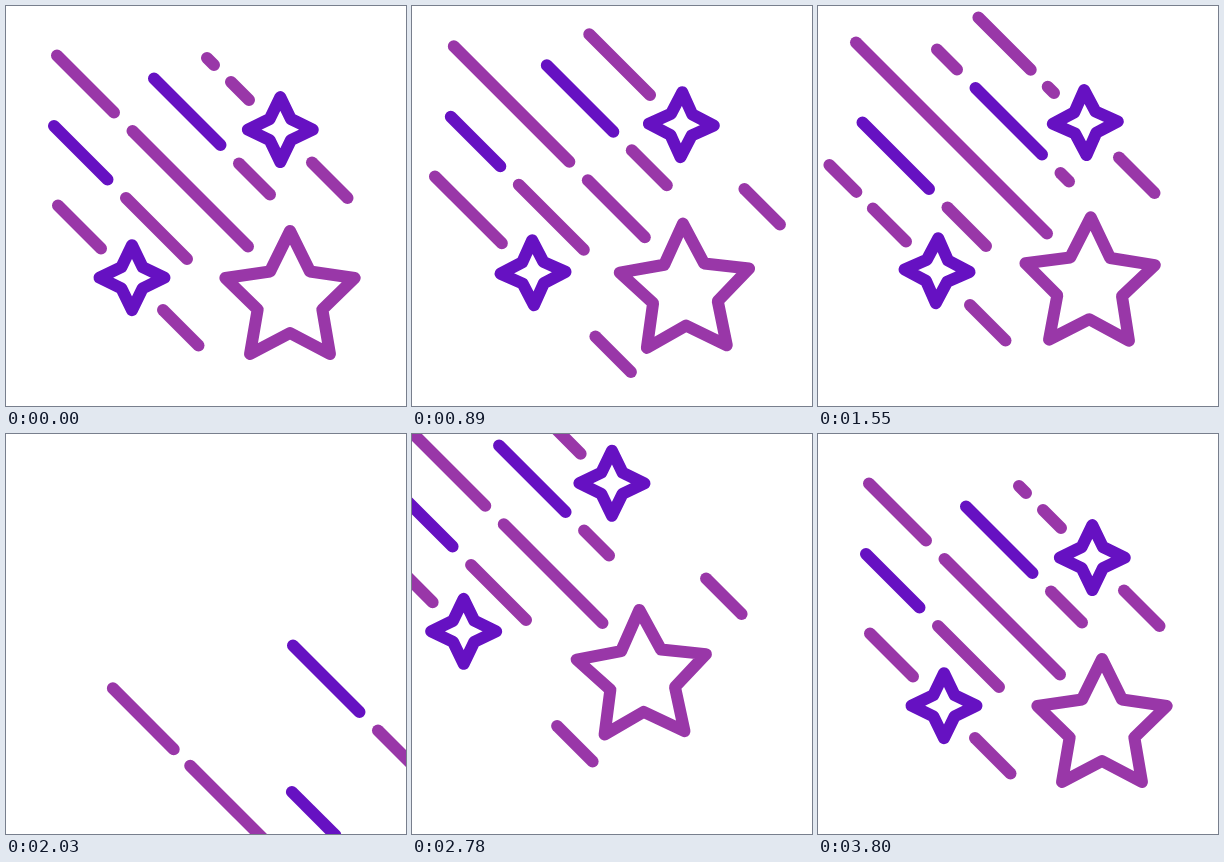
An HTML page with a canvas that plays this animation: 400 by 400 pixels, repeating every 3830 ms.

```html
<!DOCTYPE html>
<html lang="en">
<head>
<meta charset="utf-8">
<title>Shooting stars</title>
<style>
  html, body { margin: 0; width: 100%; height: 100%; overflow: hidden; background: #fff; }
  canvas { display: block; width: 400px; height: 400px; }
</style>
</head>
<body>
<canvas width="400" height="400"></canvas>
<script>
const ctx = document.querySelector('canvas').getContext('2d');
const PINK = '#9937a8', VIOLET = '#6611c2';
const LOOP = 3830, HOLD = 200, STEP = 30;
const STEPS = 120, REENTRY = 67;

// Sum of sine harmonics, zero at both ends of the loop
const sway = (n, ...amps) =>
  amps.reduce((sum, a, i) => sum + a * Math.sin((i + 1) * Math.PI * n / STEPS), 0);

// One smooth bump
function pulse(n, from, length, height) {
  const u = (n - from) / length;
  return u > 0 && u < 1 ? height * Math.sin(Math.PI * u) ** 2 : 0;
}

// Diagonal travel: drift back, shoot away, come in again from the top left
function travel(n, back, launch, power) {
  if (n < REENTRY) {
    const drift = Math.sin(Math.PI / 2 * Math.min(1, n / 46));
    return 2 * Math.max(0, n - launch) ** 2 - back * drift;
  }
  const left = (STEPS - n) / (STEPS - REENTRY);
  return -58 * left - 342 * left ** power;
}

// 45 degree line from x = a to x = b, where x - y = lane
function line(lane, a, b, color) {
  ctx.strokeStyle = color;
  ctx.beginPath();
  ctx.moveTo(a, a - lane);
  ctx.lineTo(b, b - lane);
  ctx.stroke();
}

// Dashes flowing through the window from..to, which itself moves by shift
function dashes(lane, from, to, shift, first, length, gap, colors) {
  const period = length + gap;
  for (let k = Math.floor((from - first) / period); first + k * period < to; k++) {
    const a = Math.max(from, first + k * period);
    const b = Math.min(to, first + k * period + length);
    if (b > a) line(lane, a + shift, b + shift, colors[Math.abs(k % colors.length)]);
  }
}

function star(x, y, points, outer, inner, degrees, color, pivot = 0) {
  ctx.save();
  ctx.translate(x + pivot, y + pivot);
  ctx.rotate(degrees * Math.PI / 180);
  ctx.translate(-pivot, -pivot);
  ctx.strokeStyle = color;
  ctx.beginPath();
  for (let i = 0; i < points * 2; i++) {
    const r = i % 2 ? inner : outer, angle = i * Math.PI / points;
    ctx.lineTo(r * Math.sin(angle), -r * Math.cos(angle));
  }
  ctx.closePath();
  ctx.stroke();
  ctx.restore();
}

function draw(n) {
  ctx.clearRect(0, 0, 400, 400);

  const main = travel(n, 13, 47, 7.15);
  const upper = travel(n, 13, 52, 5.5);
  const lower = travel(n, 13, 49.8, 5.5);
  const right = travel(n, 7, 49, 5);
  const left = travel(n, 7, 51, 5);

  // Middle lanes
  const flow = 8.5 * n + sway(n, -36, 9, -18);
  const mainFlow = 6.375 * n + sway(n, -83, -44);
  dashes(1.5, 51, 242, main, 126.5 + mainFlow, 236.5, 18.5, [PINK]);
  dashes(75.5, 132, 264, upper, 148 + flow, 66.5, 18.5, [VIOLET, PINK]);
  dashes(-72, 48, 181, lower, 35 + flow, 66.5, 18.5, [VIOLET, PINK]);

  // Outer lanes, whose tails stretch; the left one also lags at launch
  const stretch = sway(n, 31, 7);
  const lag = left - travel(n, 7, 54.2, 5);
  const outerFlow = 23 / 3 * n;
  const dip = 64 * Math.sin(Math.PI * n / STEPS) ** 2;
  dashes(149, 201 - stretch, 243, right, 225 + outerFlow - sway(n, 62), 75, 17, [PINK]);
  dashes(-147.5, 52 - stretch - lag, 95, left, 139.5 + outerFlow - dip, 75.5, 16.5, [PINK]);

  // Short dashes darting ahead of the small stars
  const ahead = travel(n, 5, 51, 5.5)
    + pulse(n, 0, 31, 57) + pulse(n, 70, 27, 60) + pulse(n, 97, 16, 52);
  line(149.5, 306 + ahead, 341.5 + ahead, PINK);
  line(-147, 157 + ahead, 192.5 + ahead, PINK);

  // Stars
  const tilt = sway(n, -1.1, 0.65, -1.25, -0.9);
  const smallTilt = sway(n, -1.3, 0, 2.4);
  star(284 + main, 293 + main, 5, 68, 34, tilt, PINK, 55);
  star(274.3 + right, 123.6 + right, 4, 32.5, 15, smallTilt, VIOLET);
  star(126 + left, 271.7 + left, 4, 32.5, 15, -smallTilt, VIOLET);
}

ctx.lineWidth = 12;
ctx.lineCap = ctx.lineJoin = 'round';
const start = performance.now();

function tick() {
  const t = (performance.now() - start) % LOOP;
  draw(Math.max(0, Math.floor((t - HOLD) / STEP)));
  requestAnimationFrame(tick);
}
tick();
</script>
</body>
</html>
```
